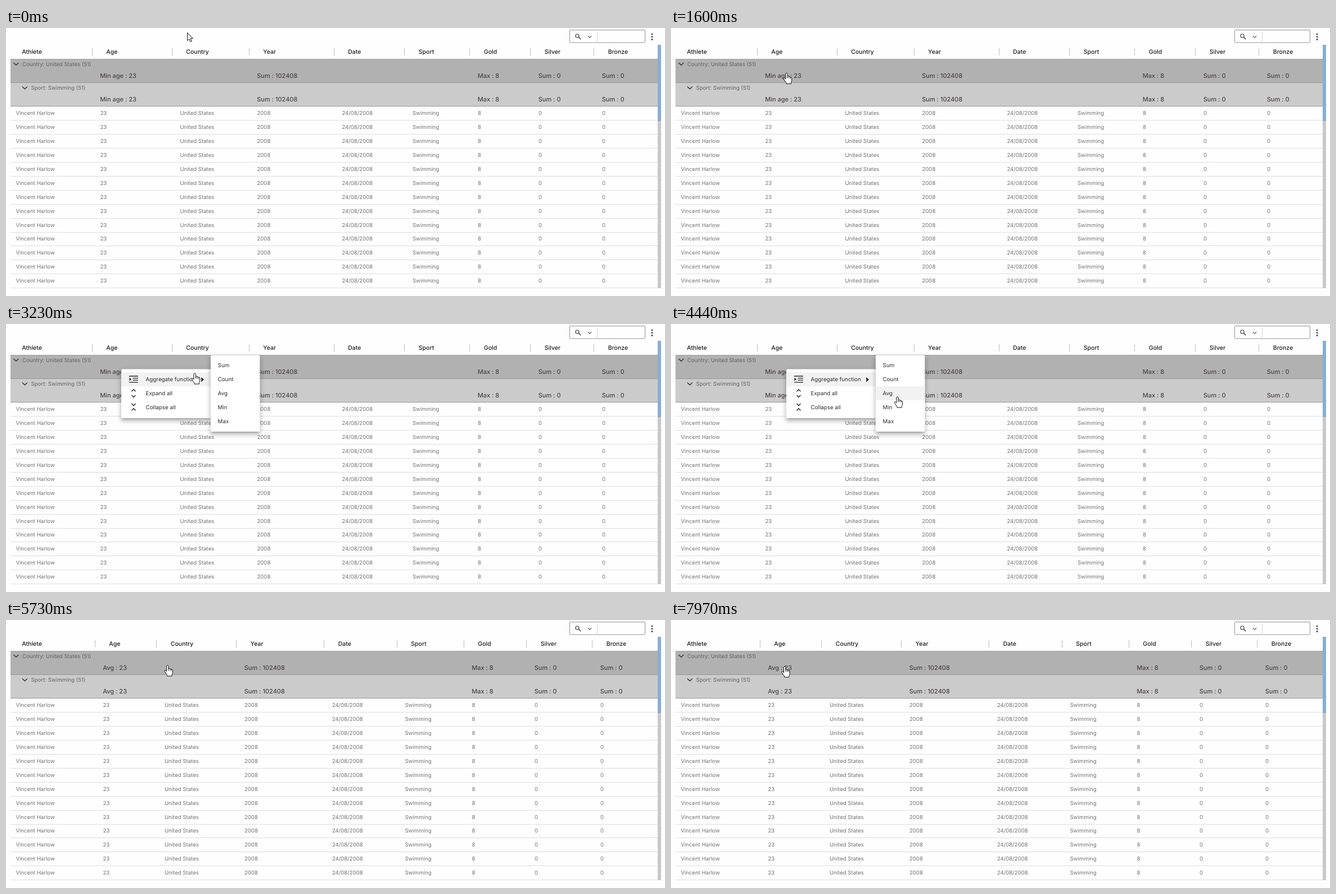
An HTML page that plays this animation: 1172 by 478 pixels, repeating every 8000 ms.

```html
<!DOCTYPE html>
<html lang="en">
<head>
<meta charset="utf-8">
<title>Grouped grid</title>
<style>
  html, body { margin: 0; width: 100%; height: 100%; overflow: hidden; background: #fefefe; }
  svg { display: block; width: 1172px; height: 478px; }
  text { font: 9.65px Inter, "Open Sans", sans-serif; fill: #747272; text-rendering: geometricPrecision; white-space: pre; }
  .head { font-size: 10.5px; font-weight: 500; fill: #1c1c1c; }
  .agg { font-size: 11px; font-weight: 500; fill: #4a4549; }
  .group { fill: #626262; }
  .item { font-size: 9.8px; fill: #2b2b2b; }
</style>
</head>
<body>
<svg id="stage" viewBox="0 0 1172 478" xmlns="http://www.w3.org/2000/svg"></svg>
<script>
const LOOP = 8000, STEP = 67.7, PICK = 4510, PITCH = 24.9;
const stage = document.getElementById('stage');

function add(parent, tag, attrs, content) {
  const el = document.createElementNS('http://www.w3.org/2000/svg', tag);
  for (const k in attrs) el.setAttribute(k, attrs[k]);
  if (content !== undefined) el.textContent = content;
  parent.appendChild(el);
  return el;
}
const rect = (p, x, y, width, height, fill, more) => add(p, 'rect', { x, y, width, height, fill, ...more });
const text = (p, x, y, s, cls = '') => add(p, 'text', { x, y, class: cls }, s);
const line = (p, d, stroke, w = 1) => add(p, 'path', { d, stroke, 'stroke-width': w, fill: 'none' });
const shape = (p, d, fill) => add(p, 'path', { d, fill });

// Table background
rect(stage, 0, 0, 1172, 478, '#fefefe');
rect(stage, 8, 55, 1151, 43, '#b1b1b1');
rect(stage, 8, 98, 1151, 42, '#cbcbcb');
line(stage, 'M8 55.5H1159', '#a6a6a6');
line(stage, 'M8 97.5H1159M8 139.5H1159', '#989898');
for (let r = 1; r <= 13; r++) {
  line(stage, `M8 ${Math.floor(139.9 + r * PITCH) + 0.5}H1159`, '#dedede');
}
rect(stage, 1159, 30, 6, 136, '#86afd5');
rect(stage, 1159, 166, 6, 298, '#c8c8c8');

// Toolbar
rect(stage, 1002.5, 3.5, 134, 22.5, '#fefefe', { stroke: '#929292', rx: 1.5 });
add(stage, 'circle', { cx: 1016, cy: 14, r: 3.1, fill: 'none', stroke: '#5c5c5c', 'stroke-width': 1.4 });
line(stage, 'M1018.3 16.3L1022.2 20.2', '#5c5c5c', 1.7);
line(stage, 'M1034.8 14.2L1038 17.2L1041.2 14.2', '#5c5c5c', 1.2);
line(stage, 'M1051.5 7V24', '#d4d4d4');
for (const cy of [11, 15.7, 20.4]) add(stage, 'circle', { cx: 1149, cy, r: 1.6, fill: '#555' });

// Group titles
line(stage, 'M13.5 62L18 66.3L22.5 62', '#333', 1.4);
line(stage, 'M29 104.5L33.5 108.8L38 104.5', '#333', 1.4);
text(stage, 29, 67.6, 'Country: United States (51)', 'group');
text(stage, 44.5, 110, 'Sport: Swimming (51)', 'group');

// Columns: one set of dividers per layout
const titles = ['Athlete', 'Age', 'Country', 'Year', 'Date', 'Sport', 'Gold', 'Silver', 'Bronze'];
const cells = ['Vincent Harlow', '23', 'United States', '2008', '24/08/2008', 'Swimming', '8', '0', '0'];

function layout(edges, ageTotal) {
  const g = add(stage, 'g', {});
  const totals = ['', ageTotal, '', 'Sum : 102408', '', '', 'Max : 8', 'Sum : 0', 'Sum : 0'];
  [3, ...edges].forEach((edge, c) => {
    if (c) line(g, `M${Math.floor(edge) + 0.5} 36V49`, '#bdbdbd');
    text(g, edge + 25.3, 46.2, titles[c], 'head');
    for (const y of [88.6, 130.9]) if (totals[c]) text(g, edge + 14.2, y, totals[c], 'agg');
    for (let r = 0; r < 13; r++) text(g, edge + 14.4, 155.3 + r * PITCH, cells[c]);
  });
  return g;
}
const before = layout([153, 295, 432, 583, 708.5, 824.5, 932.5, 1045.5], 'Min age : 23');
const after = layout([158, 267.5, 409.5, 565.5, 695, 814, 925.5, 1042.5], 'Avg : 23');

// Menus; each shadow is offset, spread, blur, opacity
const shadows = [[3.6, -2, 1.8, 0.2], [5.8, 0.7, 3.6, 0.14], [2, 1.4, 5, 0.12]];

function panel(x, y, w, h, items, indent) {
  const el = add(stage, 'g', {});
  for (const [drop, grow, blur, opacity] of shadows) {
    rect(el, x - grow, y + drop - grow, w + 2 * grow, h + 2 * grow, '#000',
      { opacity, style: `filter: blur(${blur}px)` });
  }
  rect(el, x, y, w, h, '#fff', { rx: 2 });
  const glow = rect(el, x, 0, w, PITCH, '#f2f2f2');
  items.forEach((s, i) => text(el, x + indent, y + 21.5 + i * PITCH, s, 'item'));
  return { el, glow, x, y, w, count: items.length };
}
const menu = panel(205, 80.5, 159, 87.5, ['Aggregate function', 'Expand all', 'Collapse all'], 43.6);
const sub = panel(364, 55.5, 87.5, 136.5, ['Sum', 'Count', 'Avg', 'Min', 'Max'], 12.6);
line(menu.el, 'M219 93H235M225.5 96.6H235M225.5 100.2H235M219 103.8H235', '#222', 1.3);
shape(menu.el, 'M219.5 95.4L223 98.4L219.5 101.4Z', '#222');
line(menu.el, 'M223.5 120.3L227 116.8L230.5 120.3M223.5 127L227 130.5L230.5 127', '#222', 1.4);
line(menu.el, 'M223.5 142L227 145.5L230.5 142M223.5 154.3L227 150.8L230.5 154.3', '#222', 1.4);
shape(menu.el, 'M347.3 94.8L351.8 99.2L347.3 103.6Z', '#222');

// Pointers, both with the hot spot at 0,0
const ink = { fill: '#fff', stroke: '#111', 'stroke-width': 1, 'stroke-linejoin': 'round' };
const arrow = add(stage, 'path', { ...ink, d: 'M.5 .5V14.6L3.8 11.6L6 16.6L8.2 15.6L6.1 10.8H10.4Z' });
const hand = add(stage, 'path', { ...ink, d:
  'M-2 1.8Q-2 .4 -.4 .4Q1.3 .4 1.3 1.8V6Q2.8 5.2 4 6.6Q5.6 6 6.5 7.4Q8.7 7.2 8.7 9.4V13.4' +
  'Q8.7 15.4 7.4 17V19.5H-1V17.6Q-3 15.6 -3.8 13.6L-5.7 10.9Q-6 8.7 -4.3 9.2L-2 11.2Z' +
  'M1.3 6V9.6M4 6.8V9.8M6.5 7.6V10' });

// Pointer path: time, x, y
const path = [
  [793, 322, 8], [1330, 186, 80], [1600, 206, 80],
  [2690, 206, 80], [2910, 252, 95], [3230, 336, 87.5], [3500, 349, 89],
  [3570, 349, 89], [4370, 403, 129.5],
  [4843, 403, 129.5], [5660, 295, 85], [5730, 287.5, 80.5],
  [6133, 287.5, 80.5], [6670, 270.5, 77.5],
  [7003, 270.5, 77.5], [7500, 228, 85], [7830, 208, 84], [7970, 202.5, 82.5]
];
const clamp = v => Math.min(1, Math.max(0, v));
const smooth = v => v * v * (3 - 2 * v);

function pointer(t) {
  const i = path.findIndex(k => k[0] > t);
  if (i === 0) return path[0].slice(1);
  if (i < 0) return path[path.length - 1].slice(1);
  const [t0, x0, y0] = path[i - 1], [t1, x1, y1] = path[i];
  const p = smooth((t - t0) / (t1 - t0));
  return [x0 + (x1 - x0) * p, y0 + (y1 - y0) * p];
}

function show(el, on) { el.setAttribute('display', on ? 'inline' : 'none'); }

// Fade and grow from the corner; returns whether the panel is open
function open(m, start, t, raw) {
  const p = clamp((t - start) / 220), e = 1 - (1 - p) ** 2, s = 0.8 + 0.2 * e;
  const on = p > 0 && raw < PICK;
  show(m.el, on);
  m.el.setAttribute('opacity', e);
  m.el.setAttribute('transform', `translate(${m.x * (1 - s)} ${m.y * (1 - s)}) scale(${s})`);
  return on;
}

function rowAt(m, x, y) {
  const row = Math.floor((y - m.y - 5.8) / PITCH);
  return x >= m.x && x < m.x + m.w && row < m.count ? Math.max(row, -1) : -1;
}

function light(m, row) {
  show(m.glow, row >= 0);
  m.glow.setAttribute('y', m.y + 5.8 + row * PITCH);
}

function draw(raw) {
  const t = 860 + Math.floor((raw - 848) / STEP) * STEP;
  const [x, y] = pointer(t);
  show(before, raw < PICK);
  show(after, raw >= PICK);
  const menuOn = open(menu, 2100, t, raw), subOn = open(sub, 2940, t, raw);
  const item = rowAt(menu, x, y), choice = rowAt(sub, x, y);
  light(menu, subOn ? 0 : item); // the parent item stays lit
  light(sub, choice);
  const link = menuOn ? item >= 0 || choice >= 0 : y > 55;
  show(hand, link);
  show(arrow, !link);
  (link ? hand : arrow).setAttribute('transform', `translate(${x} ${y})`);
}

const begin = performance.now();
function tick() {
  draw((performance.now() - begin) % LOOP);
  requestAnimationFrame(tick);
}
draw(0);
requestAnimationFrame(tick);
</script>
</body>
</html>
```
